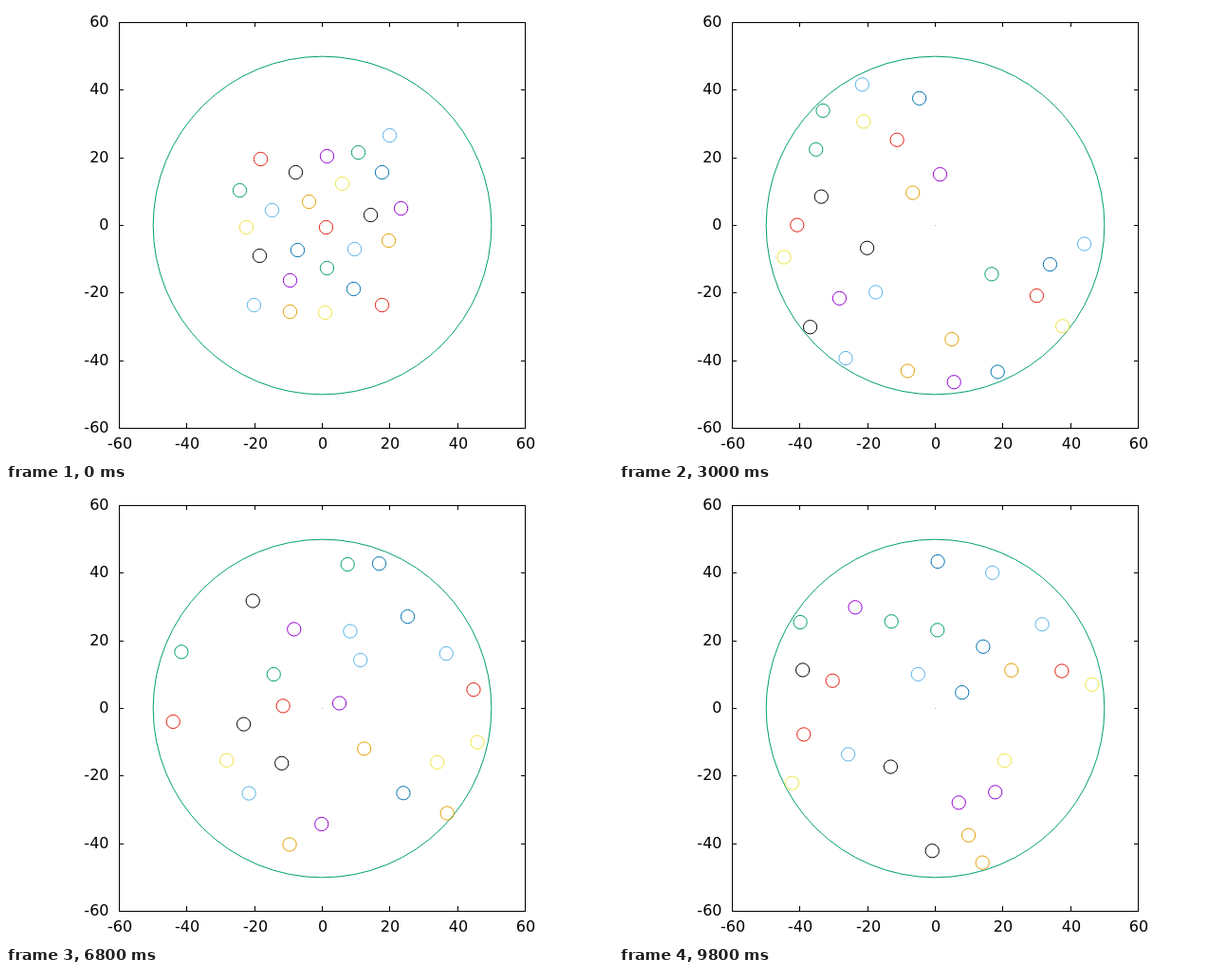
Animation of 640x480 px, one loop 9900 ms. Source, as an HTML page with a canvas:

```html
<!DOCTYPE html>
<html>
<head>
<meta charset="utf-8">
<style>
html, body { margin: 0; width: 100%; height: 100%; overflow: hidden; background: #fff; }
canvas { display: block; }
</style>
</head>
<body>
<canvas id="stage" width="640" height="480"></canvas>
<script>
const ctx = document.getElementById('stage').getContext('2d');
const CX = 333.5, CY = 231.5, UNIT = 428 / 120;
const STEP = 100, STEPS = 99, RELEASE = 19, SPEED = 7;
const WALL = 48 * UNIT, REACH = 33, SUBSTEPS = 10;
const COLORS = ['#56b4e9', '#e69f00', '#f0e442', '#0072b2', '#e51e10', '#000', '#9400d3', '#009e73'];

// Each particle: start and place at RELEASE; after that it moves freely.
const particles = [
  [261,315, 257,321], [299,322, 304,389], [336,323, 430,329], [366,298, 382,363], [396,315, 426,361],
  [267,263, 220,348], [299,289, 330,365], [338,276, 394,324], [367,256, 304,338], [403,247, 354,212],
  [253,233, 164,241], [307,257, 305,103], [337,233, 316,197], [384,220, 282,219], [416,213, 407,209],
  [246,194, 195,161], [280,215, 252,124], [319,206, 297,303], [354,187, 312,158], [396,175, 432,238],
  [268,161, 251,195], [305,175, 287,180], [338,158, 250,239], [371,154, 277,146], [404,136, 471,203]
];

function guided([x0, y0, x1, y1], step) {
  const k = step / RELEASE;
  return { x: x0 + (x1 - x0) * k, y: y0 + (y1 - y0) * k };
}

function release([x0, y0, x, y]) {
  const angle = Math.atan2(y - y0, x - x0);
  return { x, y, vx: SPEED * Math.cos(angle), vy: SPEED * Math.sin(angle) };
}

function collide(a, b) {
  const dx = b.x - a.x, dy = b.y - a.y, d = Math.hypot(dx, dy);
  if (d >= REACH) return;
  const nx = dx / d, ny = dy / d;
  const closing = (a.vx - b.vx) * nx + (a.vy - b.vy) * ny;
  if (closing <= 0) return;
  a.vx -= closing * nx; a.vy -= closing * ny;
  b.vx += closing * nx; b.vy += closing * ny;
}

function bounce(p) {
  const dx = p.x - CX, dy = p.y - CY, r = Math.hypot(dx, dy);
  const out = (p.vx * dx + p.vy * dy) / r;
  if (r < WALL || out <= 0) return;
  p.vx -= 2 * out * dx / r;
  p.vy -= 2 * out * dy / r;
}

function advance(bodies) {
  for (let s = 0; s < SUBSTEPS; s++) {
    bodies.forEach((a, i) => {
      for (const b of bodies.slice(i + 1)) collide(a, b);
    });
    for (const p of bodies) {
      bounce(p);
      p.x += p.vx / SUBSTEPS;
      p.y += p.vy / SUBSTEPS;
    }
  }
}

function buildTimeline() {
  const timeline = [];
  for (let i = 0; i <= RELEASE; i++) timeline.push(particles.map(p => guided(p, i)));
  const bodies = particles.map(release);
  while (timeline.length < STEPS) {
    advance(bodies);
    timeline.push(bodies.map(({ x, y }) => ({ x, y })));
  }
  return timeline;
}

function line(x1, y1, x2, y2) {
  ctx.beginPath();
  ctx.moveTo(x1, y1);
  ctx.lineTo(x2, y2);
  ctx.stroke();
}

function ring(x, y, radius, color) {
  ctx.strokeStyle = color;
  ctx.beginPath();
  ctx.arc(x, y, radius * UNIT, 0, 2 * Math.PI);
  ctx.stroke();
}

function drawAxes() {
  ctx.strokeStyle = ctx.fillStyle = '#000';
  ctx.font = '16px "DejaVu Sans", sans-serif';
  ctx.strokeRect(119.5, 17.5, 428, 428);
  for (let v = -60; v <= 60; v += 20) {
    const x = Math.floor(CX + v * UNIT) + 0.5, y = Math.floor(CY - v * UNIT) + 0.5;
    line(x, 445, x, 440);
    line(x, 18, x, 22);
    line(119, y, 124, y);
    line(547, y, 543, y);
    ctx.textAlign = 'center';
    ctx.fillText(v, x + 0.5, 467);
    ctx.textAlign = 'right';
    ctx.fillText(v, 108.5, y + 4.5);
  }
}

const timeline = buildTimeline();

function draw() {
  const step = Math.floor(performance.now() / STEP) % STEPS;
  ctx.fillStyle = '#fff';
  ctx.fillRect(0, 0, 640, 480);
  ctx.lineWidth = 1;
  drawAxes();
  ctx.fillStyle = 'rgba(148, 0, 211, 0.4)';
  ctx.fillRect(333, 231, 1, 1);
  ring(CX, CY, 50, '#009e73');
  timeline[step].forEach((p, i) => ring(p.x + 0.5, p.y + 0.5, 2, COLORS[i % COLORS.length]));
  requestAnimationFrame(draw);
}
draw();
</script>
</body>
</html>
```
